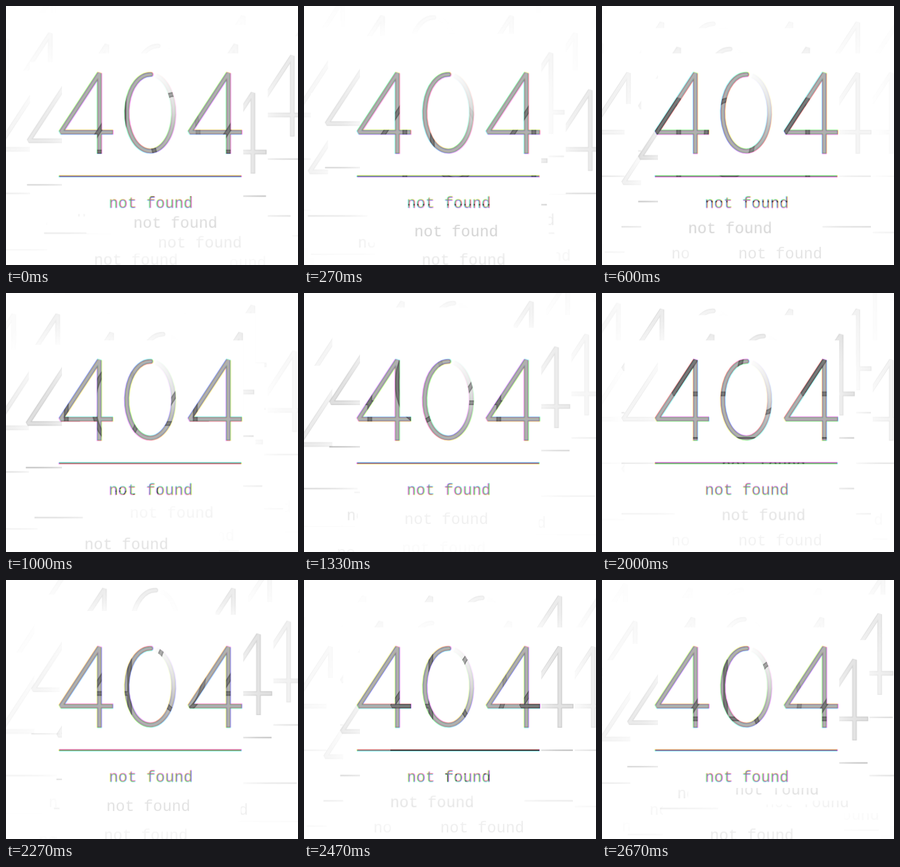
An HTML page with a canvas that plays this animation: 480x426 px, repeating every 2740 ms.

```html
<!DOCTYPE html>
<html lang="en">
<head>
<meta charset="utf-8">
<title>404</title>
<style>
html, body { margin: 0; width: 100%; height: 100%; overflow: hidden; background: #fff; }
canvas { display: block; }
</style>
</head>
<body>
<canvas id="stage" width="480" height="426"></canvas>
<script>
const W = 480, H = 426, TAU = Math.PI * 2;
const LOOP = 2740, STEP = 200 / 3, LAST = 40, TURN = 42;
const ctx = document.getElementById('stage').getContext('2d');

function layer() {
  const canvas = document.createElement('canvas');
  canvas.width = W;
  canvas.height = H;
  return canvas.getContext('2d');
}

// The whole sign on a transparent layer; only the masked channels are inked.
function sign(mask) {
  const c = layer();
  const ink = level => `rgb(${mask.map(on => on ? level : 255)})`;

  // Dark rim first, then the lighter core of each stroke.
  c.lineJoin = 'bevel';
  for (const [width, level] of [[7.6, 132], [4.6, 176]]) {
    const inset = (7.6 - width) / 2;
    c.lineWidth = width;
    c.strokeStyle = c.fillStyle = ink(level);
    for (const x of [0, 212]) {
      c.beginPath();
      c.moveTo(x + 176 - inset, 207.5);
      c.lineTo(x + 90, 207.5);
      c.lineTo(x + 153.5, 110.5);
      c.lineTo(x + 153.5, 243 - inset);
      c.stroke();
    }

    const fade = c.createConicGradient(-TAU / 4, 237, 175.5);
    for (const [at, amount] of [[0, 0], [.08, .15], [.25, .5], [.35, .8], [.45, 1], [.99, 1], [1, 1]])
      fade.addColorStop(at, ink(Math.round(255 - (255 - level) * amount)));
    c.strokeStyle = fade;
    c.beginPath();
    c.ellipse(237, 175.5, 38.5, 63, 0, -TAU * .21, TAU * .75);
    c.stroke();
    c.beginPath();
    c.arc(238, 112.5, width / 2, 0, TAU);
    c.fill();
  }

  c.fillStyle = ink(112);
  c.fillRect(87, 278.8, 300, 2.4);
  c.font = '25.6px "Courier New", "Liberation Mono", monospace';
  c.fillStyle = ink(135);
  c.fillText('not found', 169, 331.5);
  return c.canvas;
}

const grey = sign([1, 1, 1]);
const inks = [sign([0, 1, 0]), sign([1, 0, 0]), sign([0, 0, 1])];
const overlap = layer();
const rings = [[3, .1], [2, .25], [1, .4]];

const orbit = (ring, angle) => [55 * ring * Math.cos(angle), 48 * ring * Math.sin(angle)];

// A soft white card hides whatever lies behind a sign.
function card(x, y) {
  ctx.globalAlpha = 1;
  ctx.shadowColor = '#fff';
  ctx.shadowBlur = 44;
  ctx.fillStyle = '#fff';
  ctx.fillRect(x + 92, y + 78, 298, 264);
  ctx.shadowColor = 'transparent';
}

// Echoes grow stronger around the ring, each covering the one before.
function drawRing(ring, strength, angle) {
  const count = 3 * ring;
  for (let i = 1; i <= count; i++) {
    const [x, y] = orbit(ring, angle - (i + ring - 1) * TAU / count);
    card(x, y);
    ctx.globalAlpha = strength * i / count;
    ctx.drawImage(grey, x, y);
  }
}

function drawOverlap(x, y) {
  overlap.globalCompositeOperation = 'source-over';
  overlap.clearRect(0, 0, W, H);
  overlap.drawImage(grey, x, y);
  overlap.globalCompositeOperation = 'destination-in';
  overlap.drawImage(grey, 0, 0);
  ctx.drawImage(overlap.canvas, 0, 0);
}

function draw(time) {
  const step = Math.min(LAST, Math.floor((time % LOOP + 4) / STEP));
  const angle = (step + 5) * TAU / TURN;

  ctx.globalCompositeOperation = 'source-over';
  ctx.globalAlpha = 1;
  ctx.fillStyle = '#fefefe';
  ctx.fillRect(0, 0, W, H);

  for (const [ring, strength] of rings) drawRing(ring, strength, angle);

  card(0, 0);
  ctx.globalCompositeOperation = 'multiply';
  inks.forEach((image, i) => {
    const [x, y] = orbit(1, angle - TAU / 12 + i * TAU / 3);
    ctx.drawImage(image, x / 75, y / 75);
  });
  drawOverlap(...orbit(1, angle));
}

const start = performance.now();
function tick() {
  draw(performance.now() - start);
  requestAnimationFrame(tick);
}
tick();
</script>
</body>
</html>
```
